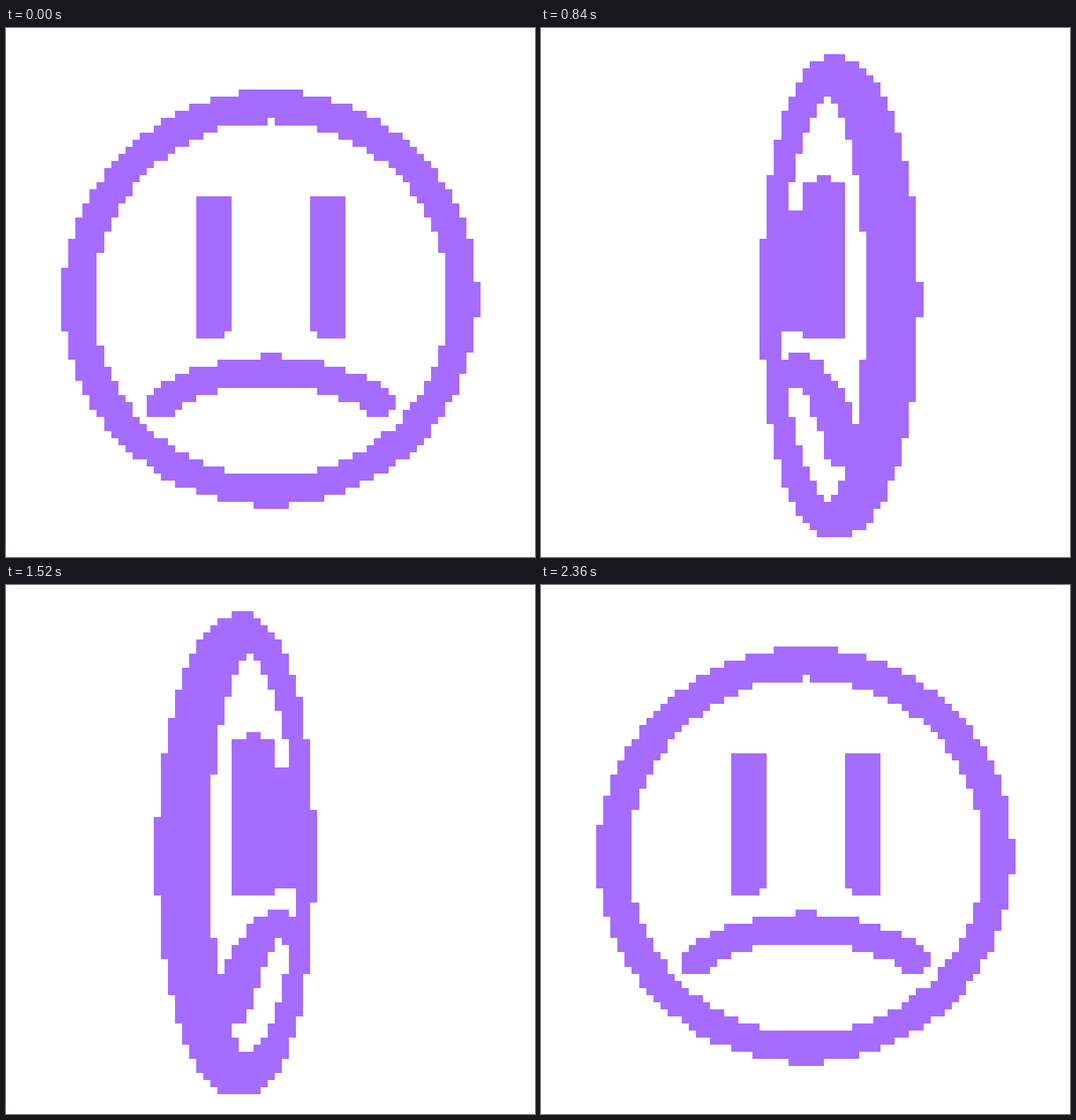
Write an HTML page with a canvas that moves like this. It is 748 px wide and 748 px high and loops after 2400 ms.

```html
<!DOCTYPE html>
<html lang="en">
<head>
<meta charset="utf-8">
<title>Turning sad face</title>
<style>
  html, body { margin: 0; width: 100%; height: 100%; overflow: hidden; background: #fff; }
  canvas { display: block; width: 100vw; height: 100vh; }
</style>
</head>
<body>
<canvas id="stage" width="748" height="748"></canvas>
<script>
const SIZE = 748, COLOR = '#a66bff';
const STEP = 40, STEPS = 60;
const CENTER = { x: 374, y: 382.7 };
const FOCAL = 555.4, DISTANCE = 551.4;
const GRID = { x: -2.2, y: -3.2, cell: 10.05, count: 75 };
const SIDES = 24;

const stage = document.getElementById('stage').getContext('2d');
const buffer = document.createElement('canvas');
buffer.width = buffer.height = SIZE;
const solid = buffer.getContext('2d', { willReadFrequently: true });

// A tube is a list of rims; each rim is a circle around one point of a flat path.
function tube(radius, steps, pathAt, depth = 0) {
  return Array.from({ length: steps + 1 }, (_, i) => {
    const { x, y, nx, ny } = pathAt(i / steps);
    return Array.from({ length: SIDES }, (_, j) => {
      const a = j / SIDES * 2 * Math.PI;
      const out = radius * Math.cos(a);
      return { x: x + nx * out, y: y + ny * out, z: depth + radius * Math.sin(a) };
    });
  });
}

const arc = (radius, centerY, from, to) => p => {
  const a = from + (to - from) * p;
  const nx = Math.sin(a), ny = -Math.cos(a);
  return { x: radius * nx, y: centerY + radius * ny, nx, ny };
};

const upright = (x, top, bottom) => p => ({ x, y: top + (bottom - top) * p, nx: 1, ny: 0 });

const mouthAngle = 35.2 * Math.PI / 180;
const parts = [
  tube(19.4, 96, arc(271.6, 0, 0, 2 * Math.PI), -4),
  tube(24, 1, upright(-79.7, -138.5, 49)),
  tube(24, 1, upright(79.7, -138.5, 49)),
  tube(20, 28, arc(286, 387, -mouthAngle, mouthAngle)),
];

function project(point, cos, sin) {
  const x = point.x * cos + point.z * sin;
  const z = point.z * cos - point.x * sin;
  const scale = FOCAL / (DISTANCE - z);
  return [CENTER.x + x * scale, CENTER.y + point.y * scale];
}

function fillPolygon(points) {
  solid.beginPath();
  for (const [x, y] of points) solid.lineTo(x, y);
  solid.fill();
}

function drawTube(rims) {
  fillPolygon(rims[0]);
  fillPolygon(rims[rims.length - 1]);
  for (let i = 1; i < rims.length; i++) {
    const a = rims[i - 1], b = rims[i];
    for (let j = 0; j < SIDES; j++) {
      const k = (j + 1) % SIDES;
      fillPolygon([a[j], a[k], b[k], b[j]]);
    }
  }
}

function drawSolid(angle) {
  const cos = Math.cos(angle), sin = Math.sin(angle);
  solid.clearRect(0, 0, SIZE, SIZE);
  solid.fillStyle = COLOR;
  for (const part of parts) {
    drawTube(part.map(rim => rim.map(point => project(point, cos, sin))));
  }
}

function drawCells() {
  const { data } = solid.getImageData(0, 0, SIZE, SIZE);
  const edge = (start, n) => Math.round(start + n * GRID.cell);
  const middle = (start, n) => Math.floor(start + (n + 0.5) * GRID.cell);
  stage.fillStyle = '#fff';
  stage.fillRect(0, 0, SIZE, SIZE);
  stage.fillStyle = COLOR;
  for (let row = 0; row < GRID.count; row++) {
    const y = middle(GRID.y, row), top = edge(GRID.y, row);
    const height = edge(GRID.y, row + 1) - top;
    for (let col = 0; col < GRID.count; col++) {
      const x = middle(GRID.x, col);
      if (x >= SIZE || y >= SIZE || data[(y * SIZE + x) * 4 + 3] < 128) continue;
      const left = edge(GRID.x, col);
      stage.fillRect(left, top, edge(GRID.x, col + 1) - left, height);
    }
  }
}

const smooth = p => p * p * (3 - 2 * p);
let start = null, shown = -1;

function tick(now) {
  if (start === null) start = now;
  const step = Math.floor((now - start) / STEP) % STEPS;
  if (step !== shown) {
    shown = step;
    drawSolid(2 * Math.PI * smooth(step / (STEPS - 1)));
    drawCells();
  }
  requestAnimationFrame(tick);
}
requestAnimationFrame(tick);
</script>
</body>
</html>
```
